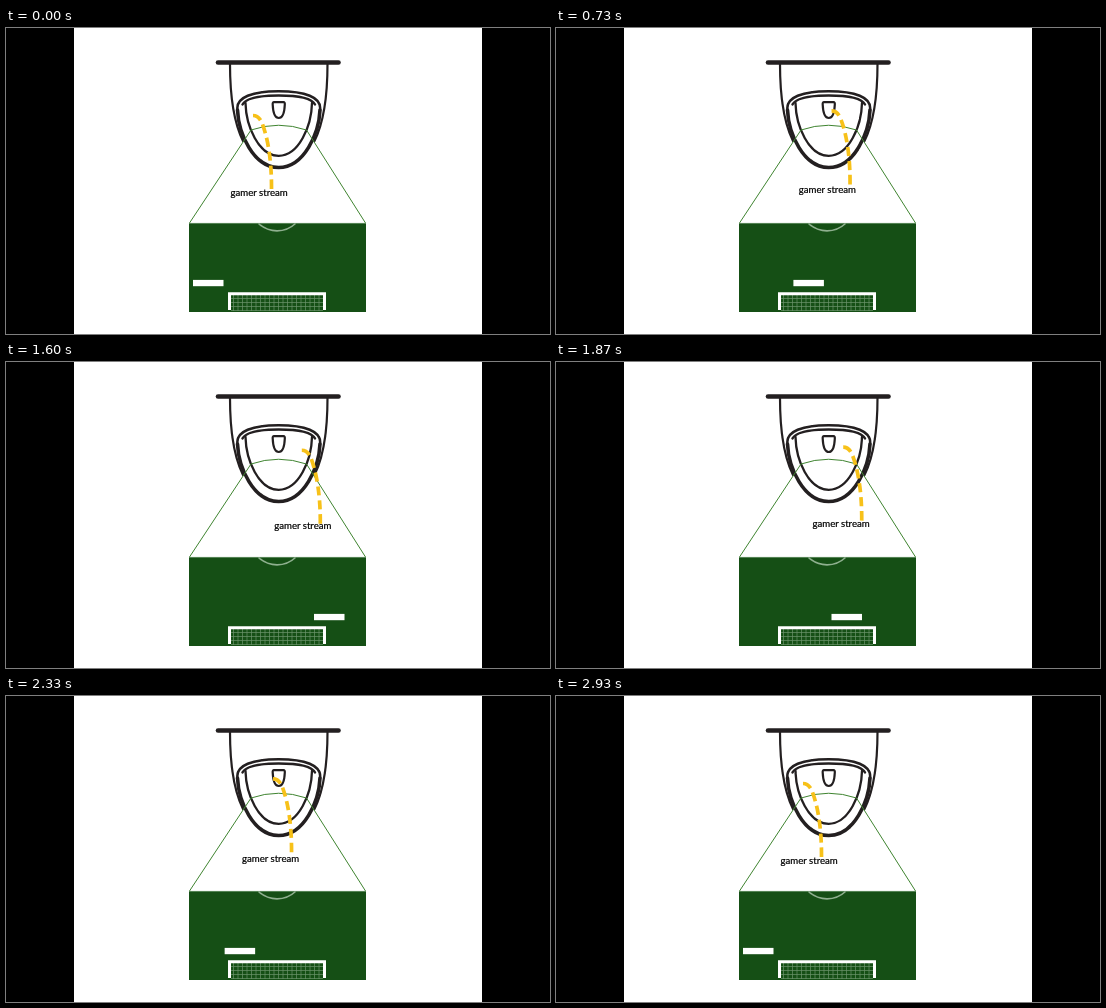
Recreate the animation shown at these times as an HTML page. Size 544 by 306 pixels, loop 2.99 s.

```html
<!DOCTYPE html>
<html lang="en">
<head>
<meta charset="utf-8">
<title>Stream</title>
<style>
  html, body { margin: 0; width: 100%; height: 100%; overflow: hidden; background: #000; }
  svg { display: block; width: 544px; height: 306px; }
  text { font: 9.65px Lato, Carlito, sans-serif; fill: #000; stroke: #000; stroke-width: .2px; }
  .ink { fill: none; stroke: #231f20; stroke-linecap: round; stroke-linejoin: round; }
  .guide { fill: none; stroke: #3f8430; stroke-width: 1; }
</style>
</head>
<body>
<svg viewBox="0 0 544 306">
  <rect x="68" width="408" height="306" fill="#fff"/>

  <g class="ink">
    <path d="M212 34.5H332.500" stroke-width="4.600"/>
    <path d="M224 36C224 62 226.500 92 237 113M321.500 36C321.500 62 319 92 308.500 113" stroke-width="2.200"/>
    <path d="M231.500 82C232.500 105 247 139.500 272.700 139.500S313 105 314 82" stroke-width="3.600"/>
    <path d="M231.500 82C229.500 69 247 63.200 272.700 63.200S316 69 314 82" stroke-width="2.500"/>
    <path d="M236.500 76.500C240 69.500 256 67.500 272.700 67.500S305.500 69.500 309 76.500" stroke-width="2.400"/>
    <path d="M239.500 75C240 98 252.500 127.800 272.700 127.800S305.500 98 306 75" stroke-width="2.300"/>
    <path d="M268 74.200H277.500Q279 74.200 278.800 76.500C278.500 84 276.500 90 272.800 90S267 84 266.700 76.500Q266.500 74.200 268 74.200Z" stroke-width="2.200"/>
  </g>

  <path class="guide" d="M183.500 195L245 102Q272.500 92.500 300.500 102L359.500 195"/>
  <rect x="183" y="195" width="177" height="89" fill="#154f15"/>
  <path d="M183 195.400H360" stroke="#6f996f" stroke-width=".8"/>
  <path d="M252.500 195.500A27 27 0 0 0 289.500 195.500" fill="none" stroke="#8fb08f" stroke-width="1.600"/>
  <path id="net" fill="none" stroke="#6c946c" stroke-width=".7"/>
  <path d="M223.500 282V265.700H318.500V282" fill="none" stroke="#fff" stroke-width="3"/>

  <rect id="keeper" x="187" y="251.900" width="30.500" height="6.300" fill="#fff"/>
  <path id="stream" d="M247 87.500C250.500 87.500 254 90 256 95C261.500 109 265.700 131 265.500 161"
        pathLength="80" fill="none" stroke="#f7c119" stroke-width="3.700" stroke-dasharray="9.300 4.840"/>
  <text id="label" x="224.500" y="168">gamer stream</text>
</svg>

<script>
  const LOOP = 2990, TURN = 1448, FRAME = 1000 / 15;
  const $ = id => document.getElementById(id);

  // Share of the outward swing, then sideways travel of each part
  const share = [0, .204, .504, .829, .895, 1];
  const keeperX = [0, 8, 50, 111, 121, 127];
  const streamX = [0, 6.8, 28.4, 46.4, 48.8, 50.5];

  function slope(ys, i) {
    if (i === 0 || i === ys.length - 1) return 0;
    return (ys[i + 1] - ys[i - 1]) / (share[i + 1] - share[i - 1]);
  }

  function ease(ys, s) {
    let i = 0;
    while (i < share.length - 2 && s > share[i + 1]) i++;
    const w = share[i + 1] - share[i], p = (s - share[i]) / w;
    const p2 = p * p, p3 = p2 * p, blend = 3 * p2 - 2 * p3;
    return ys[i] + (ys[i + 1] - ys[i]) * blend
      + w * (slope(ys, i) * (p3 - 2 * p2 + p) + slope(ys, i + 1) * (p3 - p2));
  }

  // Height of a shallow arch that returns to zero at 2 * half
  const arch = (x, half, rise) => -rise * (1 - ((x - half) / half) ** 2);

  const move = (id, x, y) => $(id).setAttribute("transform", `translate(${x.toFixed(2)} ${y.toFixed(2)})`);

  function draw(ms) {
    const step = Math.floor((ms % LOOP + 5) / FRAME);
    const t = step * FRAME;
    const s = Math.max(0, 1 - Math.abs(t - TURN) / TURN);
    const k = ease(keeperX, s), x = ease(streamX, s), l = k * .361;
    move("keeper", k, 0);
    move("stream", x, arch(x, 23.5, 4.8));
    move("label", l, arch(l, 25, 3.3));
  }

  let net = "";
  for (let x = 227.5; x < 317; x += 4.5) net += `M${x} 267V283`;
  for (let y = 270.5; y < 284; y += 4) net += `M225 ${y}H317`;
  $("net").setAttribute("d", net);

  const start = performance.now();
  function tick() {
    draw(performance.now() - start);
    requestAnimationFrame(tick);
  }
  draw(0);
  requestAnimationFrame(tick);
</script>
</body>
</html>
```
